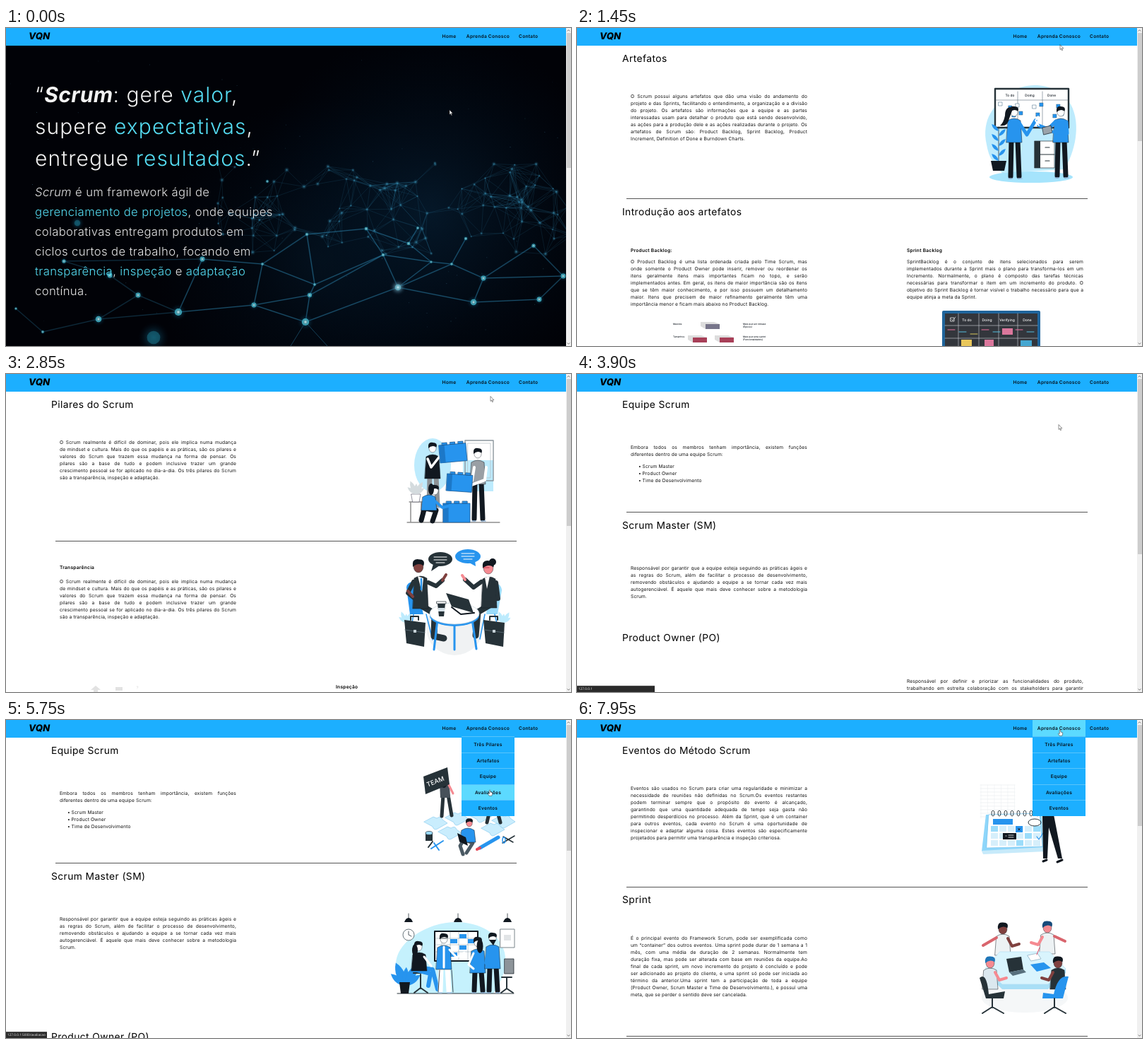
Recreate the animation shown at these times as an HTML page with a canvas. Size 800x450 px, loop 8 s.

```html
<!DOCTYPE html>
<html lang="pt">
<head>
<meta charset="utf-8">
<title>Scrum</title>
<style>
html, body { margin: 0; width: 100%; height: 100%; overflow: hidden; background: #fff; }
#stage { position: relative; width: 800px; height: 450px; overflow: hidden; color: #111;
  font-family: Inter, "Open Sans", sans-serif; text-rendering: geometricPrecision; white-space: nowrap; }
#stage div, #stage svg, canvas { position: absolute; }
.page { inset: 0; visibility: hidden; }
.page svg { left: 0; top: 0; }
#stage .para { width: 250px; font-size: 6.67px; line-height: 10px; letter-spacing: .017em; }
.para p { margin: 0; text-align: justify; text-align-last: justify; }
.para p:last-child { text-align-last: left; }
.h2 { font-size: 13.8px; line-height: 20px; letter-spacing: .03em; color: #000; }
.b { font-size: 6.67px; line-height: 10px; font-weight: 600; letter-spacing: .035em; color: #000; }
.hr { left: 70px; width: 653px; height: 1px; background: #555; }
.hero { left: 41px; top: 72.5px; font-size: 30px; line-height: 45px; font-weight: 300; letter-spacing: .035em; color: #f2f2f2; }
.hero b { font-weight: 700; font-style: italic; letter-spacing: .01em; }
.sub { left: 41px; top: 219px; font-size: 16.67px; line-height: 28px; font-weight: 300; letter-spacing: .022em; color: #e6e6e6; }
.hero i, .sub i { font-style: normal; color: #55dcf2; }
#bar { width: 793px; height: 25px; background: #1cafff; }
.logo { left: 32px; top: 4px; font: italic 800 13.3px/17px Inter, sans-serif; color: #000; }
.item { font-size: 6.67px; line-height: 24px; font-weight: 600; letter-spacing: .035em; text-align: center; color: #06121c; }
#nav { left: 645px; width: 75px; height: 24px; }
#menu { left: 645px; top: 23px; width: 75px; height: 112.5px; background: #1cafff; }
#menu .item { width: 75px; height: 22.5px; line-height: 22.5px; box-sizing: border-box; border-top: .5px solid #58c4fb; }
.on { background: #5cdaff; }
#scroll { left: 793px; top: 0; width: 7px; height: 450px; background: #f0f0f0; }
#thumb { left: .5px; top: 7px; width: 6px; background: #cdcdcd; }
#status { left: 0; top: 441px; height: 9px; box-sizing: border-box; padding: 0 2px; background: #2a2a2a;
  border-top: .5px solid #555; color: #eee; font: 4.7px/9px "Open Sans", sans-serif; }
#cursor { left: 0; top: 0; overflow: visible; }
</style>
</head>
<body>
<div id="stage"></div>
<script>
const DARK = '#263238', BLUE = '#2794ee', PALE = '#bdebfd', INK = '#111820', PINK = '#f58a91', BROWN = '#80413f';
const stage = document.getElementById('stage');

// Drawing helpers
const path = (d, fill, line = 'none', w = .7) =>
  `<path d="${d}" fill="${fill}" stroke="${line}" stroke-width="${w}" stroke-linecap="round" stroke-linejoin="round"/>`;
const limb = (d, color, w = .8) => path(d, 'none', color, w);
const box = (x, y, w, h, fill, line = 'none', lw = .7) => path(`M${x} ${y}h${w}v${h}h${-w}Z`, fill, line, lw);
const oval = (x, y, rx, ry, fill, line = 'none', lw = .7) =>
  `<ellipse cx="${x}" cy="${y}" rx="${rx}" ry="${ry}" fill="${fill}" stroke="${line}" stroke-width="${lw}"/>`;
const label = (x, y, s, size, fill = INK, anchor = 'middle') =>
  `<text x="${x}" y="${y}" font-size="${size}" fill="${fill}" text-anchor="${anchor}" font-weight="500">${s}</text>`;
const turn = (x, y, a, s) => `<g transform="translate(${x} ${y}) rotate(${a})">${s}</g>`;
const svg = (...parts) => `<svg class="pics" width="800" height="450">${parts.join('')}</svg>`;
const times = (n, f) => Array.from({ length: n }, (_, i) => f(i)).join('');
const each = (list, f) => list.map(f).join('');
const leaf = (x, y, a, n, fill) => turn(x, y, a, path(`M0 0Q${-n / 3} ${-n / 2} 0 ${-n}Q${n / 3} ${-n / 2} 0 0`, fill));
const plant = (x, y, n, fill = BLUE) => each([-50, -22, 4, 30, 55], (a, i) => leaf(x, y, a, n * (i % 2 ? 1 : .75), fill));
const head = (x, y, r, skin, hair = INK) => oval(x, y, r * .85, r, skin, INK, .4) +
  path(`M${x - r} ${y}q${-r * .2} ${-r * 1.5} ${r} ${-r * 1.35}q${r * 1.3} 0 ${r * .9} ${r * 1.15}q${-r * .9} ${-r * .7} ${-r * 1.9} ${r * .2}`, hair);
const torso = (x, y, h, fill) => path(`M${x - 9} ${y + 3}Q${x} ${y - 3} ${x + 9} ${y + 3}l2 ${h - 3}h-22Z`, fill, INK, .5);
const man = (x, y, foot, shirt, legs = INK, skin = '#fff') =>
  limb(`M${x - 4} ${y + 40}L${x - 5} ${foot}M${x + 5} ${y + 40}L${x + 7} ${foot}`, legs, 7) +
  limb(`M${x - 8} ${foot + 3}h5M${x + 5} ${foot + 3}h6`, '#9bd', 1.5) + torso(x, y + 9, 34, shirt) + head(x, y, 6, skin);

// Text helpers; y is the middle of the first line
const at = (cls, x, y, s) => `<div class="${cls}" style="left:${x}px;top:${y}px">${s}</div>`;
const h2 = (y, s) => at('h2', 64, y - 10, s);
const bold = (x, y, s) => at('b', x, y - 5, s);
const para = (x, y, s) => at('para', x, y - 5, each(s.split('|'), l => `<p>${l}</p>`));
const rule = y => `<div class="hr" style="top:${y}px"></div>`;

const kanbanTeam = () =>
  path('M580 165C572 128 592 108 612 92C640 72 684 80 699 108C715 137 704 178 690 200L602 205Q584 190 580 165', PALE) +
  oval(643, 211, 59, 8, '#a5e4fc') + box(592, 86, 104, 55, '#fff', DARK, 2.4) +
  limb('M593 102H695M624 90V140M659 90V140', '#60717c', .6) +
  label(613, 97, 'To do', 4.8) + label(641, 97, 'Doing', 4.8) + label(672, 97, 'Done', 4.8) +
  times(11, i => box(597 + i * 29 % 92, 105 + i * 13 % 25, 5, 5, i % 4 ? BLUE : '#fff', '#39627d', .5)) +
  box(648, 160, 28, 38, '#fff', DARK) + box(648, 160, 8, 38, DARK) + limb('M656 179H676M663 169H669M663 188H669', DARK, 1.2) +
  limb('M597 190V140', DARK) + times(7, i => leaf(597, 188 - i * 7, i % 2 ? 45 : -45, 14, BLUE)) + path('M586 188H608L605 202H589Z', INK) +
  man(619, 119, 210, BLUE) + path('M618 112Q606 110 606 124Q604 134 599 138Q610 140 612 128Z', INK) + limb('M626 134L637 151L649 131', BLUE, 5) +
  man(685, 119, 209, BLUE) + limb('M678 132L667 143L654 138', BLUE, 5) + limb('M649 131L653 125M654 138L649 131', '#fff', 2) +
  path('M659 141L671 138L673 148L661 151Z', '#9aa3aa', INK) + limb('M693 133L694 149L675 147', BLUE, 5);

const backlogArt = () =>
  each([[136, 420, 'Maiores'], [136, 438, 'Tamanhos'], [235, 420, 'Mais que um release'], [235, 424, '(Épicos)'], [235, 438, 'Mais que uma sprint'], [235, 442, '(Funcionalidades)']],
    p => label(...p, 3.3, INK, 'start')) +
  each([[175, 416, '#77758a'], [157, 435, '#a84058'], [195, 435, '#a84058']], ([x, y, c]) =>
    path(`M${x} ${y}h19l8 3v7h-20l-7 -4Z`, '#ddd') + box(x + 7, y + 3, 20, 7, c)) +
  box(519, 402, 135, 60, '#33363c', '#20659c', 4) + limb('M540 404V450M569 404V450M597 404V450M624 404V450M521 421H652M521 439H652', '#d0d4d8', .6) +
  box(529, 410, 5, 5, 'none', '#fff') + limb('M530 412L532 414L536 409', '#fff', .6) +
  each(['To do', 'Doing', 'Verifying', 'Done'], (s, i) => label(552 + i * 28.5, 415, s, 5, '#fff')) +
  times(8, i => limb(`M${525 + i * 16} ${427 + i % 3 * 3}h10`, ['#ed72a0', '#55bfdf', '#d9c85d'][i % 3], 1)) +
  box(544, 441, 15, 9, '#e9c75b') + box(577, 441, 13, 9, '#db779c') + box(602, 425, 15, 9, '#db779c') + box(628, 442, 16, 8, '#45a7d1');

const crate = (x, y, w, h, a) => turn(x, y, a, box(0, 0, w, h, BLUE, '#174f86') + box(0, 0, w * .2, h, '#1c78c8') +
  times(3, i => box(w * (.12 + i * .3), -3, w * .18, 3, BLUE, '#174f86')));
const crateTeam = () =>
  oval(604, 129, 26, 38, PALE) + box(647, 122, 43, 44, PALE) + box(650, 94, 40, 57, 'none', '#8c969d', 1.4) + box(654, 98, 32, 49, 'none', '#b5bdc2') +
  limb('M568 210H699', '#555', 1) + limb('M571 181H591M573 182V209M588 182V209', '#555', 1) + path('M574 170H587L585 181H576Z', '#fff', '#667') + plant(580, 170, 20, '#d4dbde') +
  man(604, 105, 186, INK, '#8d9296') + limb('M597 120L602 132L616 114', '#fff', 3.5) + crate(613, 101, 38, 25, -5) +
  man(668, 113, 205, '#999fa5') + limb('M663 132L660 151M680 132L678 150L659 157', '#fff', 4) + crate(625, 141, 36, 24, 4) +
  crate(619, 183, 38, 27, 0) + limb('M593 190L609 193L604 208M592 192L588 207', INK, 7) + torso(599, 171, 22, BLUE) +
  limb('M605 178L618 189L626 187', BLUE, 4) + head(607, 165, 6, '#fff') + oval(602, 163, 4, 8, INK);

const bag = (x, y) => limb(`M${x + 9} ${y}v-5h11v5`, DARK, 2) + path(`M${x} ${y}l30 4l-2 34l-25 -5Z`, DARK) + limb(`M${x + 1} ${y + 14}l28 4`, '#53636c', 1) + box(x + 13, y + 14, 4, 4, '#c5d0d6');
const talkers = () =>
  oval(635, 360, 40, 38, '#f0f2f3') + plant(566, 352, 17, PALE) + plant(704, 352, 17, PALE) +
  path('M567 302Q568 293 580 294L591 340H572Z', BLUE) + path('M685 296Q701 294 702 306L696 340H680Z', '#9bdcfb') +
  limb('M577 340L572 371M595 340L604 376M692 340L699 370M678 340L671 375', BLUE, 1.5) +
  limb('M585 326L607 339L606 371L620 374M690 324L668 337L665 370', DARK, 9) +
  torso(587, 286, 46, DARK) + path('M583 286L591 289L589 309Z', '#fff') + limb('M588 290V305', BLUE, 2.5) +
  limb('M577 294L569 310L580 319M598 295L609 300L618 292', DARK, 6) + limb('M618 292L623 284M576 315L569 307', BROWN, 4) + head(584, 273, 8, BROWN) +
  torso(684, 287, 44, DARK) + path('M678 288L685 286L681 304Z', '#fff') + limb('M673 294L662 302L650 291M694 295L697 318L679 320', DARK, 6) + limb('M650 291L646 285', PINK, 4) +
  head(683, 275, 8, PINK) + oval(689, 266, 5, 5, INK) + limb('M676 274H684', '#c43249', 1) +
  limb('M635 345V390M611 347L606 390M660 347L666 389', BLUE, 3) + oval(635, 342, 35, 15, BLUE) + oval(635, 339, 35, 15, '#fff', '#cbd7de') +
  path('M623 310L655 319L662 338L631 329Z', DARK) + limb('M631 330L644 340L663 338', INK, 2) + path('M611 325H622L620 343H613Z', DARK) + box(610, 322, 13, 3, '#fff', DARK) + box(612, 331, 9, 5, '#d4e0e7') +
  oval(615, 262, 17, 10, DARK) + path('M605 269L602 279L614 271Z', DARK) + oval(654, 258, 18, 10, BLUE) + path('M654 266L665 272L664 264Z', BLUE) +
  limb('M606 259h18M606 263h18M609 267h12M645 254h18M645 258h18M648 262h12', '#fff', 1) + bag(564, 348) + bag(676, 348) +
  path('M127 441L134 447H130V450H124V447H120Z', '#e2e2e2') + box(155, 443, 10, 5, '#e2e2e2') + label(186, 446, '?', 6, '#ddd');

const puzzle = (x, y) => path(`M${x} ${y}l13 -7l5 2q6 -4 8 2l7 5l-14 8q-5 3 -7 -3Z`, '#c9edfd', '#8dcdf0');
const teamArt = () =>
  each([[592, 144], [622, 138], [655, 134], [688, 142], [612, 158], [673, 153]], p => puzzle(...p)) +
  limb('M619 106L617 136M626 106L631 135M687 119L681 145M693 119L700 145', DARK, 5) + path('M614 89Q622 84 628 92L629 110H615Z', '#47515a') + limb('M627 92L633 104M616 92L611 84', PINK, 3) +
  head(621, 83, 5, PINK) + oval(620, 88, 5, 8, INK) + path('M591 80L625 67L628 91L594 105Z', DARK) + turn(609, 90, -21, label(0, 0, 'TEAM', 9, '#fff')) +
  limb('M650 170L661 174L652 188M648 170L643 178L647 190', '#4a5963', 5) + torso(654, 153, 20, BLUE) + head(656, 146, 5, PINK) + path('M639 160L651 166L654 178L642 172Z', INK) +
  box(594, 160, 10, 11, DARK) + oval(599, 160, 5, 2.5, '#9bdcfb', DARK) + limb('M602 182L619 171M606 174L613 184', BLUE, 2) + limb('M598 180L604 172', DARK, 2) +
  limb('M671 181L697 166', BLUE, 5) + limb('M667 183L671 181', '#e74856', 4) + limb('M703 174L720 164M704 165L718 173', DARK, 1.5) + oval(705, 170, 2, 4, 'none', BLUE, 1.5);

const officeArt = () =>
  path('M553 356C546 326 574 302 606 291C649 277 697 293 706 329C711 353 700 372 690 387H566Q556 376 553 356', '#c5f1fd') + limb('M554 387H719', DARK, 1) +
  each([570, 640, 710], x => limb(`M${x} 274v7`, DARK) + path(`M${x - 6} 286q2 -6 6 -6q4 0 6 6Z`, INK)) +
  oval(570, 304, 8, 8, '#fff', '#68757c', 1) + limb('M570 299V304L574 306', DARK) + box(700, 296, 20, 26, '#fff', '#7a858b', 1) + box(705, 304, 10, 8, '#e1e4e6') +
  box(607, 299, 61, 42, '#fff', INK, 2) + limb('M608 309h59M608 318h59M608 328h59M617 300v40M629 300v40M641 300v40M654 300v40', '#879aa5', .5) +
  each([[629, 310], [642, 303], [654, 310], [642, 319], [629, 329]], p => box(...p, 10, 6, BLUE)) +
  plant(565, 376, 35) + path('M557 371H572L570 387H559Z', INK) +
  limb('M577 358H598M587 360V380M578 386L587 379L597 386', DARK, 2) + limb('M584 350L604 353L611 381M582 354L601 359L598 376', BLUE, 6) +
  torso(585, 329, 26, INK) + limb('M592 335L602 348', '#fff', 3) + head(584, 321, 6, '#fff') + oval(579, 326, 4, 9, INK) +
  man(620, 310, 383, BLUE, '#fff') + limb('M620 321V350M628 325L638 336L649 329', '#fff', 3) + limb('M614 354L612 385M631 354L633 385M614 309H624', INK) +
  man(668, 315, 383, BLUE) + oval(671, 320, 4.5, 10, INK) + limb('M662 330L655 346L662 352', '#fff', 3) +
  man(689, 309, 383, BLUE) + path('M684 311H694L690 319Z', INK) + limb('M683 326L679 344L688 348', BLUE, 4) +
  box(706, 338, 13, 21, '#8d9499', INK) + limb('M702 364H716M709 365V380M701 386L709 380L718 386', DARK, 2);

const calendarArt = () =>
  times(10, i => limb(`M571 ${92 + i * 5}h49`, '#e6eaec', .6)) + times(6, i => limb(`M${572 + i * 9.5} 92v47`, '#edf0f1', .6)) +
  path('M579 134L658 132L660 184L573 186Z', '#8ed6fa') + path('M583 134L655 132L659 179L580 181Z', '#fff', '#7bc6ef') + path('M573 185L661 180L663 186L575 190Z', '#c7eafa') +
  times(8, i => oval(589 + i * 9, 132, 2, 4, 'none', DARK, .9)) + box(589, 140, 28, 8, BLUE) +
  times(18, i => box(586 + i % 6 * 12, 150 + (i / 6 | 0) * 10, 10, 8, i % 5 ? '#d6effb' : '#9bdcfa')) +
  box(621, 150, 10, 9, BLUE) + label(626, 157, '×', 8) + box(603, 160, 19, 9, INK) + limb('M607 164h1M611 163h7M611 166h7', '#fff') +
  oval(648, 145, 9, 5, 'none', DARK, 1) + limb('M651 165L654 169L660 160', BLUE, 1.2) +
  path('M659 134H675L687 196H681L668 152L666 196H660Z', INK) + limb('M660 200L665 198M680 201L687 198', INK, 3);

const seat = (x, y, dir, skin, shirt, hair = INK) =>
  torso(x, y + 7, 30, shirt) + limb(`M${x + 7 * dir} ${y + 13}l${6 * dir} 11l${10 * dir} -3`, skin, 4) + head(x, y, 7, skin, hair);
const meetingArt = () =>
  oval(634, 393, 61, 21, '#f5f7f8') + seat(603, 296, 1, BROWN, '#edf2f4') + seat(666, 294, -1, PINK, '#edf2f4', '#174b7b') +
  limb('M594 308L575 319M676 306L691 313', '#d9656d', 4) + path('M578 352V358L602 381H667L692 358V352Z', '#a9dff6') + path('M599 328H669L692 352L667 374H602L578 352Z', '#d9f4fd', '#b3dff2') +
  path('M608 338L629 335L632 353L612 357Z', DARK) + path('M612 357L632 353L636 357L617 362Z', '#58707d') + path('M638 333L652 330L657 338L643 341Z', '#fff', '#83a8be') + path('M642 346L661 343L671 351L651 356Z', BLUE) + limb('M651 332L655 322', '#e14863', 1) +
  seat(585, 344, 1, PINK, '#dbe8ef', '#1f76b8') + path('M570 365Q580 356 583 388L606 384L604 394H579Z', DARK) +
  seat(681, 344, -1, BROWN, DARK) + path('M696 363Q681 360 675 388L660 386L659 394H688Z', BLUE) +
  limb('M588 394V407M574 415L588 406L604 415M676 394V407M662 415L676 406L692 415', DARK, 2);

const pillars = 'O Scrum realmente é difícil de dominar, pois ele implica numa mudança|de mindset e cultura. Mais do que os papéis e as práticas, são os pilares e|valores do Scrum que trazem essa mudança na forma de pensar. Os|pilares são a base de tudo e podem inclusive trazer um grande|crescimento pessoal se for aplicado no dia-a-dia. Os três pilares do Scrum|são a transparência, inspeção e adaptação.';
const team = (s, rest) => h2(44, 'Equipe Scrum') +
  para(76, 103.5, 'Embora todos os membros tenham importância, existem funções|diferentes dentro de uma equipe Scrum:') +
  each(['Scrum Master', 'Product Owner', 'Time de Desenvolvimento'], (t, i) => para(87, 130.5 + i * 10.2, '•') + para(92.5, 130.5 + i * 10.2, t)) +
  rule(195 + s) + h2(215 + s, 'Scrum Master (SM)') +
  para(76, 275 + s, 'Responsável por garantir que a equipe esteja seguindo as práticas ágeis e|as regras do Scrum, além de facilitar o processo de desenvolvimento,|removendo obstáculos e ajudando a equipe a se tornar cada vez mais|autogerenciável. É aquele que mais deve conhecer sobre a metodologia|Scrum.') + rest;

const pages = {
  home: `<canvas width="800" height="450"></canvas>
    <div class="hero">“<b>Scrum</b>: gere <i>valor</i>,<br>supere <i>expectativas</i>,<br>entregue <i>resultados</i>.”</div>
    <div class="sub"><em>Scrum</em> é um framework ágil de<br><i>gerenciamento de projetos</i>, onde equipes<br>colaborativas entregam produtos em<br>ciclos curtos de trabalho, focando em<br><i>transparência</i>, <i>inspeção</i> e <i>adaptação</i><br>contínua.</div>`,
  artifacts: h2(44, 'Artefatos') +
    para(76, 97, 'O Scrum possui alguns artefatos que dão uma visão do andamento do|projeto e das Sprints, facilitando o entendimento, a organização e a divisão|do projeto. Os artefatos são informações que a equipe e as partes|interessadas usam para detalhar o produto que está sendo desenvolvido,|as ações para a produção dele e as ações realizadas durante o projeto. Os|artefatos de Scrum são: Product Backlog, Sprint Backlog, Product|Increment, Definition of Done e Burndown Charts.') +
    rule(241) + h2(261, 'Introdução aos artefatos') + bold(76, 314.5, 'Product Backlog:') + bold(467, 314.5, 'Sprint Backlog') +
    para(76, 331, 'O Product Backlog é uma lista ordenada criada pelo Time Scrum, mas|onde somente o Product Owner pode inserir, remover ou reordenar os|itens geralmente itens mais importantes ficam no topo, e serão|implementados antes. Em geral, os itens de maior importância são os itens|que se têm maior conhecimento, e por isso possuem um detalhamento|maior. Itens que precisem de maior refinamento geralmente têm uma|importância menor e ficam mais abaixo no Product Backlog.') +
    para(467, 331, 'SprintBacklog é o conjunto de itens selecionados para serem|implementados durante a Sprint mais o plano para transforma-los em um|Incremento. Normalmente, o plano é composto das tarefas técnicas|necessárias para transformar o item em um incremento do produto. O|objetivo do Sprint Backlog é tornar visível o trabalho necessário para que a|equipe atinja a meta da Sprint.') +
    svg(kanbanTeam(), backlogArt()),
  pillars: h2(44, 'Pilares do Scrum') + para(76, 97, pillars) + rule(235.5) + bold(76, 273.5, 'Transparência') + para(76, 294, pillars) +
    bold(467, 443, 'Inspeção') + svg(crateTeam(), talkers()),
  teamBare: team(0, h2(374, 'Product Owner (PO)') + para(467, 434.5, 'Responsável por definir e priorizar as funcionalidades do produto,|trabalhando em estreita colaboração com os stakeholders para garantir|')),
  team: team(7, h2(449, 'Product Owner (PO)') + svg(teamArt(), officeArt())),
  events: h2(44, 'Eventos do Método Scrum') +
    para(76, 97, 'Eventos são usados no Scrum para criar uma regularidade e minimizar a|necessidade de reuniões não definidas no Scrum.Os eventos restantes|podem terminar sempre que o propósito do evento é alcançado,|garantindo que uma quantidade adequada de tempo seja gasta não|permitindo desperdícios no processo. Além da Sprint, que é um container|para outros eventos, cada evento no Scrum é uma oportunidade de|inspecionar e adaptar alguma coisa. Estes eventos são especificamente|projetados para permitir uma transparência e inspeção criteriosa.') +
    rule(235.5) + h2(255, 'Sprint') +
    para(76, 308.5, 'É o principal evento do Framework Scrum, pode ser exemplificada como|um “container” dos outros eventos. Uma sprint pode durar de 1 semana a 1|mês, com uma média de duração de 2 semanas. Normalmente tem|duração fixa, mas pode ser alterada com base em reuniões da equipe.Ao|final de cada sprint, um novo incremento do projeto é concluído e pode|ser adicionado ao projeto do cliente, e uma sprint só pode ser iniciada ao|término da anterior.Uma sprint tem a participação de toda a equipe|(Product Owner, Scrum Master e Time de Desenvolvimento.), e possuí uma|meta, que se perder o sentido deve ser cancelada.') +
    rule(447) + svg(calendarArt(), meetingArt())
};

const rows = [['Três Pilares', 'pilares'], ['Artefatos', 'artefatos'], ['Equipe', 'equipe'], ['Avaliações', 'avaliacao'], ['Eventos', 'eventos']];
stage.innerHTML = each(Object.entries(pages), ([k, s]) => `<div class="page" id="${k}">${s}</div>`) +
  `<div id="bar"><div class="logo">VQN</div><div class="item" id="nav">Aprenda Conosco</div>${at('item', 617.5, 0, 'Home')}${at('item', 726, 0, 'Contato')}</div>
  <div id="menu">${each(rows, (r, i) => at('item', 0, i * 22.5, r[0]))}</div>
  <div id="scroll"><div id="thumb"></div><svg width="7" height="450">${limb('M2 4.2L3.5 2.7L5 4.2M2 445.8L3.5 447.3L5 445.8', '#555')}</svg></div>
  <div id="status"></div>
  <svg id="cursor" width="10" height="12"><g id="arrow">${path('M0 0V6.5L1.5 5.2L2.6 7.8L3.6 7.3L2.5 4.8H4.5Z', '#fff', '#222', .5)}</g>
  <g id="hand">${path('M-.8 .5Q0 -.6 .8 .5V3L3.6 3.8V6.2L2.8 8.3H-.8L-2.7 5.3Q-2.4 4.2 -.8 5.2Z', '#fff', '#222', .5)}</g></svg>`;

function drawNetwork(g) {
  let seed = 11;
  const rnd = () => (seed = seed * 16807 % 2147483647) / 2147483647;
  const line = (a, b, alpha, w) => {
    g.strokeStyle = `rgba(50,145,190,${alpha})`; g.lineWidth = w;
    g.beginPath(); g.moveTo(a[0], a[1]); g.lineTo(b[0], b[1]); g.stroke();
  };
  const glow = (x, y, r, inner) => {
    const f = g.createRadialGradient(x, y, 0, x, y, r);
    f.addColorStop(0, inner); f.addColorStop(1, 'rgba(0,20,40,0)');
    g.fillStyle = f; g.fillRect(x - r, y - r, 2 * r, 2 * r);
  };
  g.fillStyle = '#010207'; g.fillRect(0, 0, 800, 450);
  glow(600, 260, 260, 'rgba(8,38,62,.6)');
  glow(440, 330, 230, 'rgba(6,28,46,.45)');
  const far = Array.from({ length: 115 }, () => [300 + 500 * rnd(), 190 + 130 * rnd()]);
  far.forEach((a, i) => {
    far.slice(i + 1).forEach(b => { if (Math.hypot(a[0] - b[0], a[1] - b[1]) < 46) line(a, b, .2, .7); });
    glow(...a, 2 + rnd() * 2.5, 'rgba(70,170,205,.65)');
  });
  for (let i = 0; i < 70; i++) {
    g.fillStyle = `rgba(90,170,200,${.1 + rnd() * .35})`;
    g.fillRect(rnd() * 793, 40 + rnd() * 400, .9, .9);
  }
  // Large nodes are named A to Z, then a to d
  const near = [[131,412,5],[244,402,6],[351,392,4],[424,416,6],[430,378,3.6],[437,363,2],[555,367,5],[662,388,5],[676,354,4],[747,308,3],[755,384,4],[789,351,4],[534,321,2.5],[570,305,2.6],[510,284,2.6],[426,292,2.4],[187,378,4],[209,438,11],[278,327,4],[101,276,5],[363,334,2],[602,331,1.8],[631,334,2],[52,430,2],[14,397,1.8],[147,350,4],[82,330,3],[370,217,2],[583,283,2],[651,298,2.4]];
  const node = c => near[c.charCodeAt(0) - (c < 'a' ? 65 : 71)];
  for (const [a, b] of 'AB AX AQ BC BQ BS CE CU DE DC EM EF FM FU UP US GM GH GD GW HI HK IW IJ IL JL KL MO MV VW NO NV OP PF GV XY QZ Za Sa Nc Wd'.split(' ')) {
    const p = node(a), q = node(b), s = p[0] + q[0] < 500 ? .3 : .55;
    line(p, q, s * .3, 2.2); line(p, q, s, .8);
  }
  line(near[3], [403, 450], .4, 1);
  line(near[3], [455, 450], .4, 1);
  for (const [x, y, r] of near) {
    const dim = r > 8 || (x < 110 && y < 300);
    glow(x, y, r * 2, 'rgba(30,150,190,.55)');
    g.fillStyle = dim ? 'rgba(22,95,115,.75)' : 'rgba(65,190,210,.9)';
    g.beginPath(); g.arc(x, y, r * .85, 0, 7); g.fill();
    if (!dim) glow(x, y, r * .8, '#e2ffff');
  }
  glow(555, 367, 12, 'rgba(190,240,255,.7)');
}
drawNetwork(stage.querySelector('canvas').getContext('2d'));

// [start, page, scroll thumb end, pictures loaded]
const visits = [[0, 'home', 198, 0], [950, 'artifacts', 160, 1000], [2100, 'pillars', 215, 2250],
  [3800, 'teamBare', 255, 0], [4050, 'team', 185, 0], [6850, 'events', 150, 7000]];
const opened = [[450, 950], [1500, 2100], [3000, 3800], [4750, 6850], [7650, 8000]];
const loading = [[900, 1000], [2050, 2250], [3750, 4050], [6800, 7000]];
const moves = [[0, 628, 116], [50, 628, 116], [450, 680, 14], [550, 683, 14], [850, 685, 55], [1200, 685, 55], [1450, 684, 24],
  [1500, 684, 14], [1600, 684, 14], [1900, 686, 32], [2850, 686, 32], [3100, 686, 14], [3250, 685, 14], [3550, 682, 72], [4400, 682, 72],
  [4800, 684, 14], [4950, 684, 14], [5200, 685, 52], [5300, 685, 52], [5750, 685, 99], [6050, 685, 122], [7000, 685, 122], [7600, 684, 24], [7950, 684, 14], [8000, 684, 14]];

const $ = id => document.getElementById(id);
const within = (list, t) => list.some(([a, b]) => t >= a && t < b);
const show = (id, yes) => { $(id).style.visibility = yes ? 'visible' : 'hidden'; };
const items = [...$('menu').children];

function pointer(t) {
  const i = moves.findIndex(m => m[0] > t);
  const [t0, x0, y0] = moves[i - 1], [t1, x1, y1] = moves[i];
  const k = (t - t0) / (t1 - t0), e = k * k * (3 - 2 * k);
  return [x0 + (x1 - x0) * e, y0 + (y1 - y0) * e];
}

function frame(now) {
  const t = Math.floor(now % 8000 / 50) * 50;
  const [, page, end, loaded] = visits.filter(v => v[0] <= t).pop();
  for (const k in pages) show(k, k === page);
  const pics = $(page).querySelector('.pics');
  if (pics) pics.style.display = t >= loaded ? '' : 'none';
  $('thumb').style.height = end - 7 + 'px';

  const [x, y] = pointer(t), open = within(opened, t);
  const row = open && y >= 23.5 ? Math.floor((y - 23) / 22.5) : -1;
  show('menu', open);
  $('nav').classList.toggle('on', open && row < 0);
  items.forEach((n, i) => n.classList.toggle('on', i === row));
  show('arrow', !open);
  show('hand', open);
  $('cursor').style.transform = `translate(${x}px,${y}px)`;

  const busy = within(loading, t), status = $('status');
  show('status', busy || row >= 0);
  status.style.width = busy ? '110px' : 'auto';
  status.textContent = busy ? '127.0.0.1' : row >= 0 ? '127.0.0.1:5000/' + rows[row][1] : '';
  requestAnimationFrame(frame);
}
requestAnimationFrame(frame);
</script>
</body>
</html>
```
